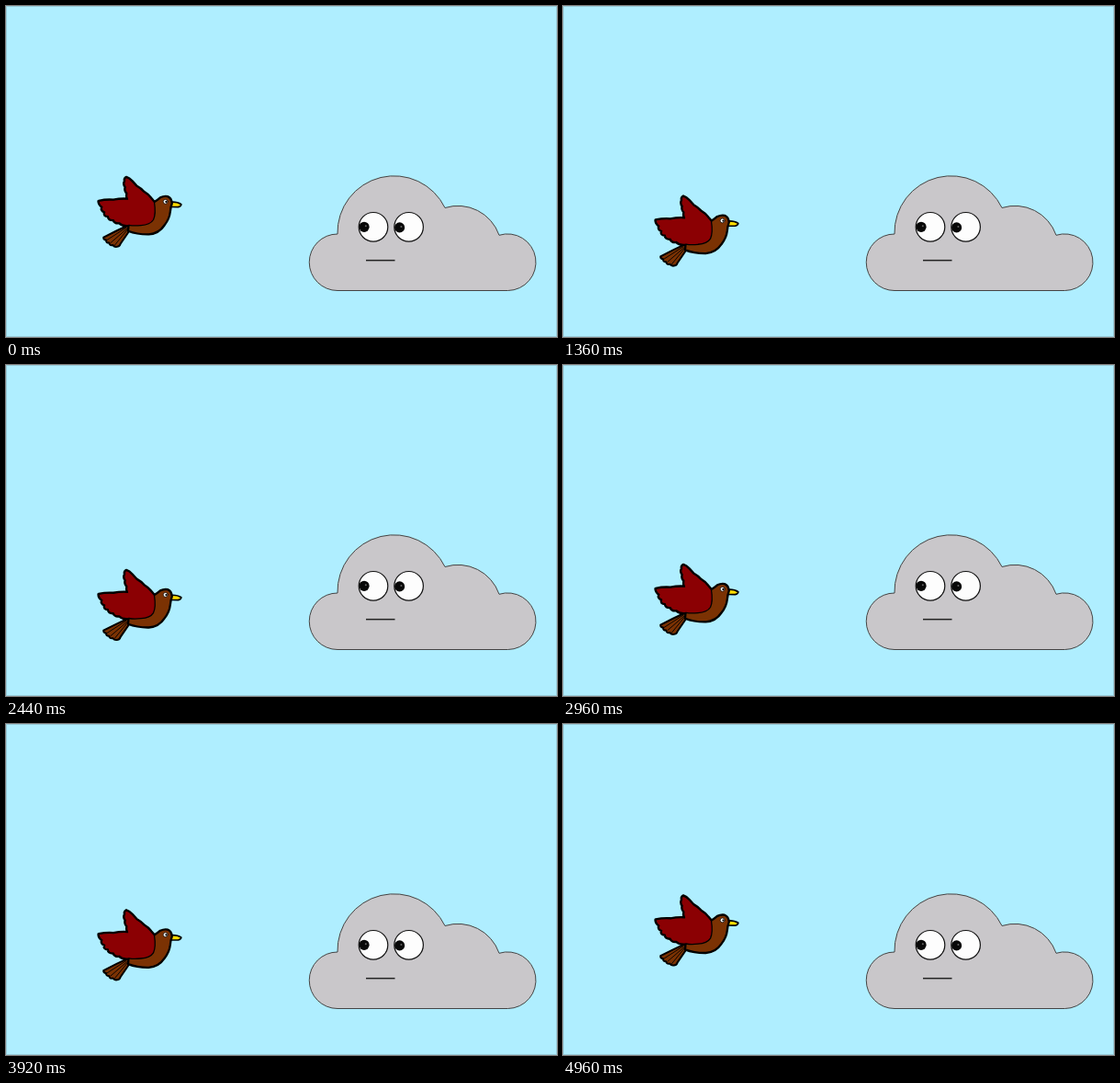
Recreate the animation shown at these times as an HTML page with a canvas. Size 600 by 360 pixels, loop 5000 ms.

```html
<!DOCTYPE html>
<html lang="en">
<head>
<meta charset="utf-8">
<title>Bird and cloud</title>
<style>
html, body { margin: 0; width: 100%; height: 100%; overflow: hidden; background: #afeeff; }
canvas { display: block; }
</style>
</head>
<body>
<canvas id="stage" width="600" height="360"></canvas>
<script>
const ctx = document.getElementById('stage').getContext('2d');
const LOOP = 5000, STEP = 40, DROP = 38;

const wing = new Path2D(`M131 186.4 Q134 187.2 137.5 191 L142 196 Q147 198.8 150 202.3
  Q155 205.3 158 209.3 L161.5 213.5
  Q163.5 226 160.5 232.5 Q157 238 147 238.6 Q139 239.4 134 238.4
  Q127 239.5 123.5 235.8 Q118.5 236.5 117 232.6 Q111.5 233 111.2 228.6
  Q106 228.5 107.6 224 Q103 222.5 104.8 218.6 Q101 216 101 212.3
  Q109 210.6 117 211.2 Q125 209.6 132.5 210.2
  Q131 207 131.8 203.5 Q129 200.5 130.2 197 Q127.6 193.5 129.6 190.5 Q128.6 188 131 186.4Z`);
const body = new Path2D(`M160 214 Q165 211 168 208.3 Q172 206.4 176 207.1 Q180.3 208.8 180.8 214.5
  Q179.2 219 178.8 224 Q178 231.5 172.5 238.5 Q166.5 247.6 155.5 248.4 Q143 248.6 133 244.7 L134 232Z`);
const tail = new Path2D(`M134 238 Q120 244.5 106.2 251.6 Q106 254.3 109 254.6
  Q108.8 257.8 112.2 257.6 Q113 261 116.2 260 Q118.5 262.8 121.8 261.6 Q123.8 261.4 124.6 258.8 L133.5 245.8Z`);
const tailLines = new Path2D('M131 241 L110 254.5 M132 242 L114 257.5 M132.5 243 L118.5 260');
const beak = new Path2D('M180.2 213.2 Q187 213 190.8 215.7 Q190.8 217.8 187.4 218.6 L180 218.4Z');

const cloud = new Path2D(`M361 309.5 A30.75 30.75 0 0 1 361 248
  A61.6 61.6 0 0 1 478 219.5 A47.5 47.5 0 0 1 537 249.3
  A30.8 30.8 0 1 1 546.5 309.5Z`);

function paint(path, fill, stroke, width) {
  ctx.fillStyle = fill;
  ctx.fill(path);
  if (!stroke) return;
  ctx.strokeStyle = stroke;
  ctx.lineWidth = width;
  ctx.stroke(path);
}

function disc(x, y, r) {
  const path = new Path2D();
  path.arc(x, y, r, 0, Math.PI * 2);
  return path;
}

function drawEye(x, pupilY) {
  paint(disc(x, 240.3, 15.8), '#fdfdfd', '#111', 1.2);
  paint(disc(x - 10, pupilY, 5.6), '#080808');
  paint(disc(x - 8.2, pupilY - 1, 1), '#666');
}

function drawCloud() {
  paint(cloud, '#c9c7ca', '#444', 1);
  drawEye(400, 240.3);
  drawEye(438.6, 240.9);
  ctx.fillStyle = '#222';
  ctx.fillRect(392, 275.9, 31.5, 1.5);
}

function drawBird(dy) {
  ctx.save();
  ctx.translate(0, dy);
  ctx.lineJoin = ctx.lineCap = 'round';
  paint(tail, '#7b3203', '#000', 2);
  ctx.lineWidth = 0.9;
  ctx.stroke(tailLines);
  paint(beak, '#ffdc00', '#000', 1.7);
  // Heavy outline outside, thin line where the wing overlaps the body.
  paint(wing, '#8b0003', '#000', 3.4);
  paint(body, '#7b3203', '#000', 2.3);
  paint(wing, '#8b0003', '#000', 1.3);
  paint(disc(173.6, 212.8, 2.4), '#fff', '#000', 0.7);
  paint(disc(174.4, 212.9, 1.1), '#000');
  ctx.restore();
}

function draw(now) {
  const t = Math.floor((now % LOOP) / STEP) * STEP;
  const dy = DROP * (1 - Math.abs(t / (LOOP / 2) - 1));
  ctx.fillStyle = '#afeeff';
  ctx.fillRect(0, 0, 600, 360);
  ctx.strokeStyle = '#98cbd8';
  ctx.lineWidth = 1;
  ctx.strokeRect(0.5, 0.5, 599, 359);
  drawCloud();
  drawBird(dy);
}

const start = performance.now();
function tick() {
  draw(performance.now() - start);
  requestAnimationFrame(tick);
}
tick();
</script>
</body>
</html>
```
